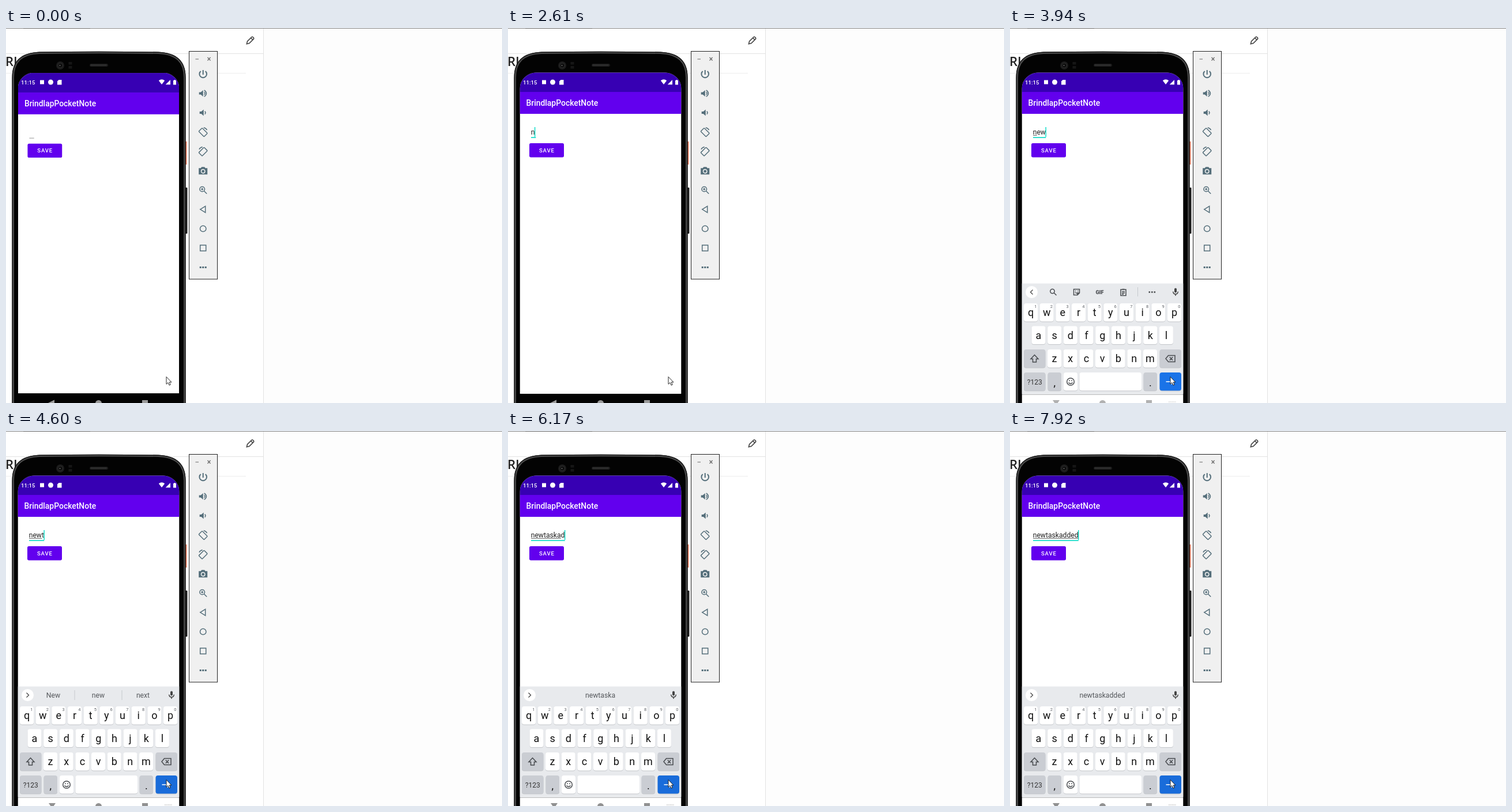
Animation of 860x651 px, one loop 8000 ms. Source, as an HTML page:

```html
<!DOCTYPE html>
<html lang="en">
<head>
<meta charset="utf-8">
<title>Task entry</title>
<style>
  html, body { margin: 0; width: 100%; height: 100%; overflow: hidden; background: #fff; }
  svg { display: block; }
  text { font-family: Roboto, sans-serif; white-space: pre; }
  .line { fill: none; stroke: currentColor; stroke-width: 1.5; }
  .bold { stroke-width: 2; }
  .solid { fill: currentColor; }
  #panel { color: #546e7a; }
  #keys text { fill: #111; font-size: 18px; text-anchor: middle; }
  #keys .hint { fill: #5f6368; font-size: 7.5px; }
  #keys .small { font-size: 12px; fill: #333; }
  .word { font-size: 12.2px; fill: #55585c; text-anchor: middle; }
  #tools, #keyIcons { color: #484b4f; }
</style>
</head>
<body>
<svg id="stage" width="860" height="651" viewBox="0 0 860 651">
  <defs>
    <clipPath id="screen"><rect x="20.5" y="77.5" width="280" height="640" rx="28"/></clipPath>
    <path id="shell" d="M10.5 700V86C10.5 58 25 43 58 41.500Q161 40 264 41.500C297 43 311.500 58 311.500 86V700Z"/>
    <clipPath id="body"><use href="#shell"/></clipPath>
  </defs>

  <!-- page behind the phone -->
  <rect width="860" height="651" fill="#fff"/>
  <rect x="447" width="413" height="651" fill="#fdfdfd"/>
  <path d="M0 .5H860" stroke="#858585"/>
  <path d="M30 .5H146" stroke="#666"/>
  <path d="M0 44.5H446M446.5 1V651" stroke="#e2e2e2"/>
  <path d="M0 78.5H416" stroke="#ececec"/>
  <text x="-1" y="66" font-size="22" font-weight="600" fill="#222" style="font-family:'Open Sans',sans-serif">RI</text>
  <g transform="translate(423 22) rotate(45)" fill="none" stroke="#444" stroke-width="1.6">
    <path d="M-2.4 4V-6.5Q-2.4-8 0-8T2.4-6.5V4L0 8ZM-2.4-4.5H2.4"/>
  </g>

  <!-- phone -->
  <rect x="310.5" y="197" width="2.8" height="40" fill="#e8704f"/>
  <rect x="310" y="277" width="4.5" height="80" rx="1" fill="#1a1a1a"/>
  <g clip-path="url(#body)" fill="none">
    <use href="#shell" fill="#030303" stroke="#4a4a4a" stroke-width="7"/>
    <use href="#shell" stroke="#111" stroke-width="2.5"/>
  </g>
  <circle cx="94" cy="65" r="7" fill="#1c1c1c"/>
  <circle cx="94" cy="65" r="4" fill="#0a0a0a" stroke="#2c2c2c"/>
  <circle cx="93.500" cy="65" r="1.200" fill="#555"/>
  <path d="M108.500 59h6v4.500h-6zM108.500 66h6v4.500h-6z" fill="#161616"/>
  <rect x="145" y="62" width="32" height="5" rx="2.5" fill="#1c1c1c"/>
  <path d="M147 64.5H175" stroke="#3a3a3a" stroke-width="3" stroke-dasharray="1 1"/>

  <g clip-path="url(#screen)">
    <g id="app">
      <rect x="20.5" y="77" width="280" height="558" fill="#fff"/>
      <rect x="20.5" y="77" width="280" height="34" fill="#3700b3"/>
      <rect x="20.500" y="111" width="280" height="38" fill="#6200ee"/>
      <text x="31.5" y="135" font-size="13.9" font-weight="500" fill="#fff">BrindlapPocketNote</text>
      <rect x="37" y="200" width="60" height="24.500" rx="2.700" fill="#6200ee"/>
      <text x="67.400" y="215.800" font-size="9.6" font-weight="500" letter-spacing=".86" text-anchor="middle" fill="#fff">SAVE</text>
      <rect id="rule" x="40"/>
      <rect id="mark" x="40" y="186" height=".8" fill="#444"/>
      <text id="entry" x="39.700" y="185" font-size="12.15" fill="#222"></text>
      <rect id="caret" y="172" width="1.400" height="17" fill="#03dac5"/>
    </g>

    <g fill="#fff">
      <text x="26" y="98" font-size="9.6" font-weight="500">11:15</text>
      <rect x="59" y="90.500" width="7" height="7"/>
      <circle cx="77.500" cy="94" r="4.500"/>
      <path d="M91.500 90H96.500V98.500H89V92.500Z"/>
      <path d="M264.800 91.200Q270 87.500 275.200 91.200L270 98Z"/>
      <path d="M285 90V98.300H276.700Z"/>
      <path d="M290 91H291.300V90H293.700V91H295V98.500H290Z"/>
    </g>

    <g id="navDark" fill="#999">
      <path d="M73 651L84 645.500V657Z"/>
      <circle cx="160.500" cy="651.500" r="5.500"/>
      <rect x="236" y="646" width="10" height="10"/>
    </g>
    <rect id="navLight" x="20.500" y="637.500" width="280" height="14" fill="#fff"/>

    <g id="keyboard">
      <rect x="20.500" y="443.500" width="280" height="193" fill="#e8eaed"/>
      <rect x="20.500" y="636.500" width="280" height="15" fill="#fff"/>
      <g id="navKeys" fill="#919191">
        <path d="M74 646H86L80 655Z"/>
        <circle cx="160.500" cy="651.500" r="5.500"/>
        <rect x="236" y="646" width="10" height="10"/>
        <path d="M275 649H288" stroke="#aaa" stroke-dasharray="1.500 1"/>
      </g>
      <circle cx="37.500" cy="458.500" r="10.500" fill="#fff"/>
      <path id="chevron" d="M-2 -4L2 0L-2 4" fill="none" stroke="#444" stroke-width="1.300"/>
      <g id="tools">
        <circle class="line" cx="73.500" cy="457" r="3.700"/><path class="line" d="M76.200 459.700L80.500 464"/>
        <path class="line" d="M110.500 453.500H120.500V460L117 463.500H110.500ZM120.500 460H117V463.500M113 459Q115.500 461.500 118 459M113 456.500H114.500M117 456.500H118.500"/>
        <text x="155.500" y="461.700" font-size="9.300" font-weight="800" text-anchor="middle" fill="#484b4f">GIF</text>
        <path class="line" d="M192 454H201V464.500H192ZM194.500 453.500H198.500M194 457.500H199M194 460H199M194 462.200H197"/>
        <path d="M221.500 450V466" stroke="#c6c9cd"/>
        <path class="solid" d="M240.500 457.200h2.600v2.600h-2.600zM245 457.200h2.600v2.600h-2.600zM249.500 457.200h2.600v2.600h-2.600z"/>
      </g>
      <g id="words">
        <path id="dividers" d="M119 450V467M201 450V467" stroke="#c6c9cd"/>
        <text class="word" x="82" y="463"></text>
        <text class="word" x="160" y="463"></text>
        <text class="word" x="237.500" y="463"></text>
      </g>
      <g color="#444">
        <rect class="solid" x="285" y="451.500" width="4" height="8" rx="2"/>
        <path class="line" d="M282.700 457.500Q283 462 287 462T291.300 457.500M287 462V465"/>
      </g>
      <g id="keys"></g>
      <g id="keyIcons">
        <path class="line" d="M42.500 567.500L49 574.500H45.500V580H39.500V574.500H36Z"/>
        <path class="line" d="M270 574L274.500 568.500H286V579.500H274.500ZM276.800 571.300L282.200 576.700M282.200 571.300L276.800 576.700"/>
        <circle class="line" cx="105" cy="614" r="6.300"/>
        <path class="line" d="M101.500 615.500Q105 619.500 108.500 615.500M102 612.200H103.800M106.200 612.200H108"/>
        <path d="M270.500 614H284M279.500 609.500L284 614L279.500 618.500" fill="none" stroke="#fff" stroke-width="1.500"/>
      </g>
    </g>
  </g>

  <!-- side toolbar -->
  <g id="panel">
    <rect x="317.500" y="40.500" width="49" height="395.500" fill="#f0f0f0" stroke="#222"/>
    <path d="M328.500 54H334M349.500 51L354.500 56.500M354.500 51L349.500 56.500" stroke="#666" stroke-width="1.200"/>
  </g>

  <path d="M278 605.500V618.300L281 615.600L283 620.200L285.200 619.200L283.200 614.900H287Z" fill="#fff" stroke="#111" stroke-width=".9"/>
</svg>
<script>
const $ = id => document.getElementById(id);
const NS = 'http://www.w3.org/2000/svg';
const add = (parent, tag, attrs, text) => {
  const el = document.createElementNS(NS, tag);
  for (const k in attrs) el.setAttribute(k, attrs[k]);
  if (text) el.textContent = text;
  return parent.appendChild(el);
};
const show = (el, on) => el.setAttribute('visibility', on ? 'inherit' : 'hidden');

// Side toolbar icons, each drawn around its own centre.
const speaker = '<path class="solid" d="M-6-2H-3L1-5.500V5.500L-3 2H-6Z"/>';
const rotate = side => `<g transform="scale(${side} 1)">
  <rect class="line" x="-4.200" y="-6.500" width="8.400" height="13" rx="1" transform="translate(0 .5) rotate(-45)"/>
  <path class="line" d="M1-7.700Q5-7 6.800-3.500"/></g>`;
const icons = [
  '<path class="line bold" d="M0-7V1M-4-5A6.300 6.300 0 1 0 4-5"/>',
  `<g transform="translate(-1 0)">${speaker}<path class="line" d="M3-2.500Q5.500 0 3 2.500M3-5.700Q10.500 0 3 5.700"/></g>`,
  `${speaker}<path class="line" d="M3-2.500Q5.500 0 3 2.500"/>`,
  rotate(1),
  rotate(-1),
  `<path class="solid" d="M-7.500-4.500H-4L-2.500-6.500H2.500L4-4.500H7.500V6.500H-7.500Z"/>
   <circle r="3.200" cy="1" fill="none" stroke="#f0f0f0" stroke-width="1.500"/>`,
  '<circle class="line" cx="-1.500" cy="-1.500" r="4.300"/><path class="line" d="M1.700 1.700L6.500 6.500M-3.500-1.500H.5M-1.500-3.500V.5"/>',
  '<path class="line" d="M-5 0L4-5.500V5.500Z"/>',
  '<circle class="line" r="5.200"/>',
  '<rect class="line" x="-5" y="-5" width="10" height="10"/>',
  '<path class="solid" d="M-6-1.500h3v3h-3zM-1.500-1.500h3v3h-3zM3-1.500h3v3h-3z"/>'
];
icons.forEach((body, i) => {
  add($('panel'), 'g', { transform: `translate(341.700 ${80 + i * 33.55})` }).innerHTML = body;
});

// Keyboard
const PITCH = 27.67, keys = $('keys');
function key(x, y, w, fill, label, cls, base = 22) {
  add(keys, 'rect', { x, y: y + 1, width: w, height: 31.5, rx: 4, fill: '#c3c6ca' });
  const face = add(keys, 'rect', { x, y, width: w, height: 31.5, rx: 4, fill });
  if (label) add(keys, 'text', { x: x + w / 2, y: y + base, class: cls || '' }, label);
  return face;
}
const GREY = '#cacdd3';
[['qwertyuiop', 36, 478], ['asdfghjkl', 49.5, 517.5], ['zxcvbnm', 77, 558]].forEach(([row, x, y]) =>
  [...row].forEach((c, i) => {
    const cx = x + i * PITCH;
    key(cx - 12, y, 24, '#fff', c);
    if (row.length === 10) add(keys, 'text', { x: cx + 8.3, y: y + 7.5, class: 'hint' }, String((i + 1) % 10));
  }));
key(24, 558, 37.5, GREY);
key(259.5, 558, 37.5, GREY);
key(24, 598, 37.5, GREY, '?123', 'small', 20.5);
key(65.5, 598, 23.5, GREY, ',', '', 24);
key(93, 598, 24, '#fff');
key(120.5, 598, 107.5, '#fff');
key(231.5, 598, 23.5, GREY, '.', '', 24);
const enter = key(259.5, 598, 37.5, '#1a73e8');

// n: typed letters, u: underlined letters, kb: keyboard stage, s: suggestions
const TEXT = 'newtaskadded', LOOP = 8000;
const steps = [
  [0, { n: 0, u: 0, kb: 0, s: '', caret: false, settled: false }],
  [150, { settled: true }],
  [2610, { n: 1, caret: true }],
  [3180, { caret: false }],
  [3580, { n: 2, caret: true }],
  [3700, { u: 1 }],
  [3820, { kb: 1 }],
  [3940, { n: 3, kb: 2 }],
  [4070, { kb: 3 }],
  [4330, { u: 3, s: 'New new next' }],
  [4600, { n: 4 }],
  [4720, { u: 4, s: 'newt new news' }],
  [4970, { n: 5, s: 'newta news newsletter' }],
  [5220, { n: 7, u: 6 }],
  [5340, { s: 'newtas' }],
  [5480, { u: 7, s: 'newtask' }],
  [5620, { n: 8 }],
  [5740, { u: 8 }],
  [5890, { s: 'newtaska' }],
  [6170, { n: 9 }],
  [6420, { n: 10, u: 9, s: 'newtaskad' }],
  [6570, { n: 11, u: 10, s: 'newtaskadd' }],
  [6690, { u: 11, s: 'newtaskadde' }],
  [6810, { n: 12 }],
  [6930, { u: 12, s: 'newtaskadded' }],
  [7490, { caret: false }],
  [7920, { caret: true }]
];

const pen = document.createElement('canvas').getContext('2d');
pen.font = '12.15px Roboto, sans-serif';
const widthOf = n => pen.measureText(TEXT.slice(0, n)).width;
const words = document.querySelectorAll('.word');

function draw(t) {
  const st = Object.assign({}, ...steps.filter(s => s[0] <= t).map(s => s[1]));
  const w = widthOf(st.n), focused = st.n > 0;

  $('app').setAttribute('transform',
    st.settled ? '' : 'translate(160.500 390) scale(.9965) translate(-160.500 -390)');
  $('entry').textContent = TEXT.slice(0, st.n);
  $('mark').setAttribute('width', widthOf(st.u));
  $('caret').setAttribute('x', 39.2 + w);
  show($('caret'), st.caret);

  const rule = $('rule');
  rule.setAttribute('y', focused ? 189.4 : 190);
  rule.setAttribute('height', focused ? 1.6 : 0.9);
  rule.setAttribute('width', Math.max(8.3, w));
  rule.setAttribute('fill', focused ? '#03dac5' : '#888');

  show($('navDark'), st.kb === 0);
  show($('navLight'), st.kb === 1);
  show($('keyboard'), st.kb > 1);
  $('navKeys').setAttribute('opacity', st.kb === 2 ? 0.7 : 1);
  enter.setAttribute('fill', st.kb === 2 ? '#1a73e8' : '#196cda');
  $('chevron').setAttribute('transform', `translate(37.500 458.500) scale(${st.kb === 2 ? -1 : 1} 1)`);

  const list = st.s.split(' '), three = list.length === 3;
  show($('tools'), !st.s);
  show($('words'), st.s);
  show($('dividers'), st.s && three);
  words.forEach((el, i) => {
    el.textContent = three ? list[i] : i === 1 ? st.s : '';
  });
}

const start = performance.now();
(function tick() {
  draw((performance.now() - start) % LOOP);
  requestAnimationFrame(tick);
})();
</script>
</body>
</html>
```
